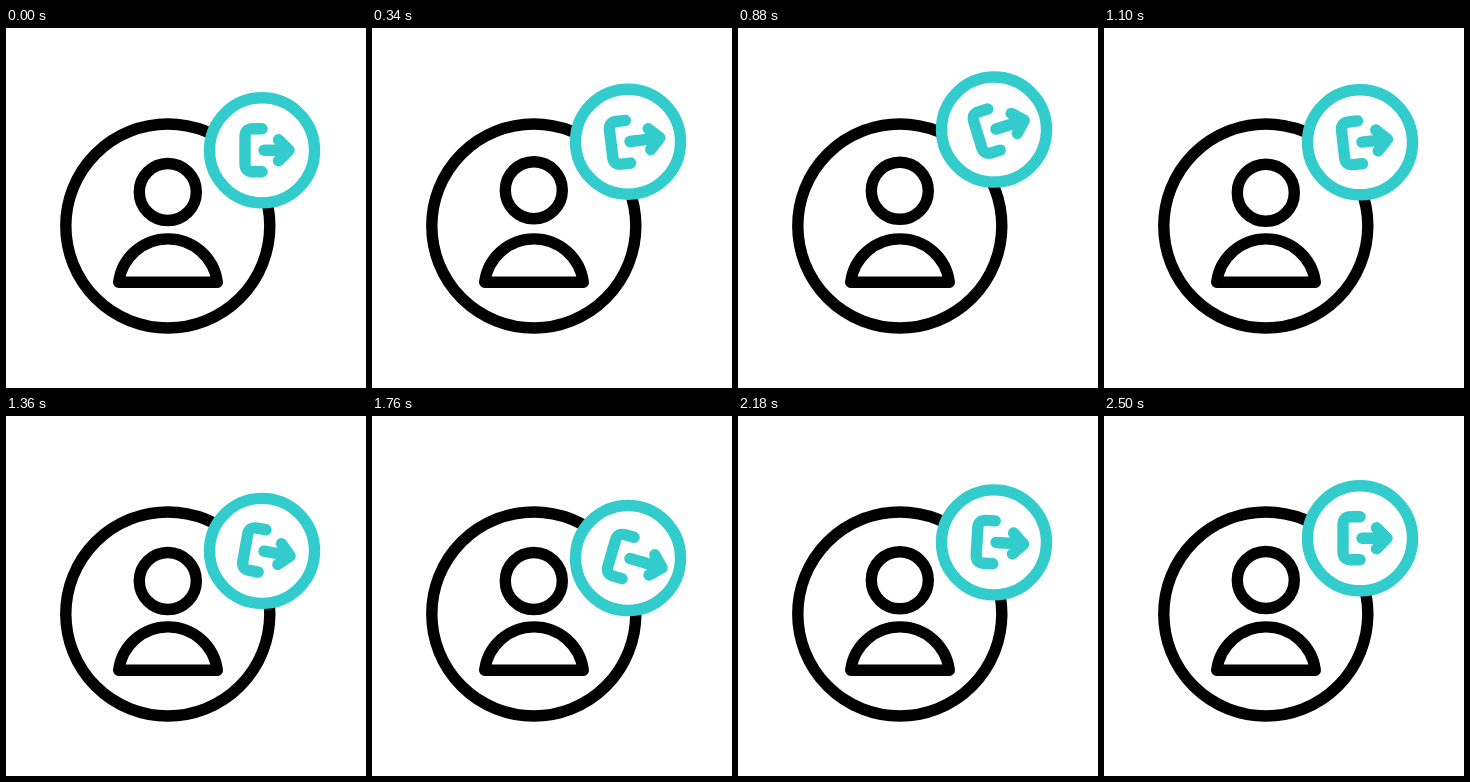
Write an HTML page that moves like this. It is 360 by 360 pixels and loops after 2.62 s.

```html
<!DOCTYPE html>
<html lang="en">
<head>
<meta charset="utf-8">
<title>User sign-out</title>
<style>
html, body { margin: 0; height: 100%; overflow: hidden; background: #fff; }
svg { display: block; width: 100vw; height: 100vh; }
</style>
</head>
<body>
<svg viewBox="0 0 360 360" fill="none" stroke="#000" stroke-width="11.4" stroke-linecap="round" stroke-linejoin="round">
  <circle cx="161.8" cy="198" r="102"/>
  <circle id="head" cx="161.8" cy="164" r="28.5"/>
  <path d="M112.7 254.3A49.7 49.7 0 0 1 211.3 254.3Z"/>
  <g id="badge" stroke="#3cc">
    <circle r="52.5" fill="#fff"/>
    <g id="icon">
      <path d="M0-21.5H-9Q-17-21.5-17-13.5V13.5Q-17 21.5-9 21.5H0"/>
      <path id="arrow"/>
    </g>
  </g>
</svg>
<script>
const LOOP = 2620;
const $ = id => document.getElementById(id);
const smooth = u => u * u * (3 - 2 * u);

// Eases through evenly spaced keyframes, then holds the last value.
function ease(time, step, values) {
  const i = Math.floor(time / step);
  if (i >= values.length - 1) return values[values.length - 1];
  return values[i] + (values[i + 1] - values[i]) * smooth(time / step - i);
}

function draw(time) {
  const swing = ease(time, 800, [0, -1, 1, 0]);
  const reach = ease(time, 600, [0, 8.5, 0, 8.5, 0]);
  const nod = ease(time, 600, [0, -3, 1, 1, 0]);
  const tip = 27 + reach;
  $("head").setAttribute("cy", 164 + nod);
  $("badge").setAttribute("transform", `translate(256 ${122.3 + 22 * swing})`);
  $("icon").setAttribute("transform", `rotate(${18 * swing})`);
  $("arrow").setAttribute("d", `M2 0H${tip}M${tip - 10.5}-10.5L${tip} 0L${tip - 10.5} 10.5`);
}

function frame(now) {
  draw(now % LOOP);
  requestAnimationFrame(frame);
}
requestAnimationFrame(frame);
</script>
</body>
</html>
```
